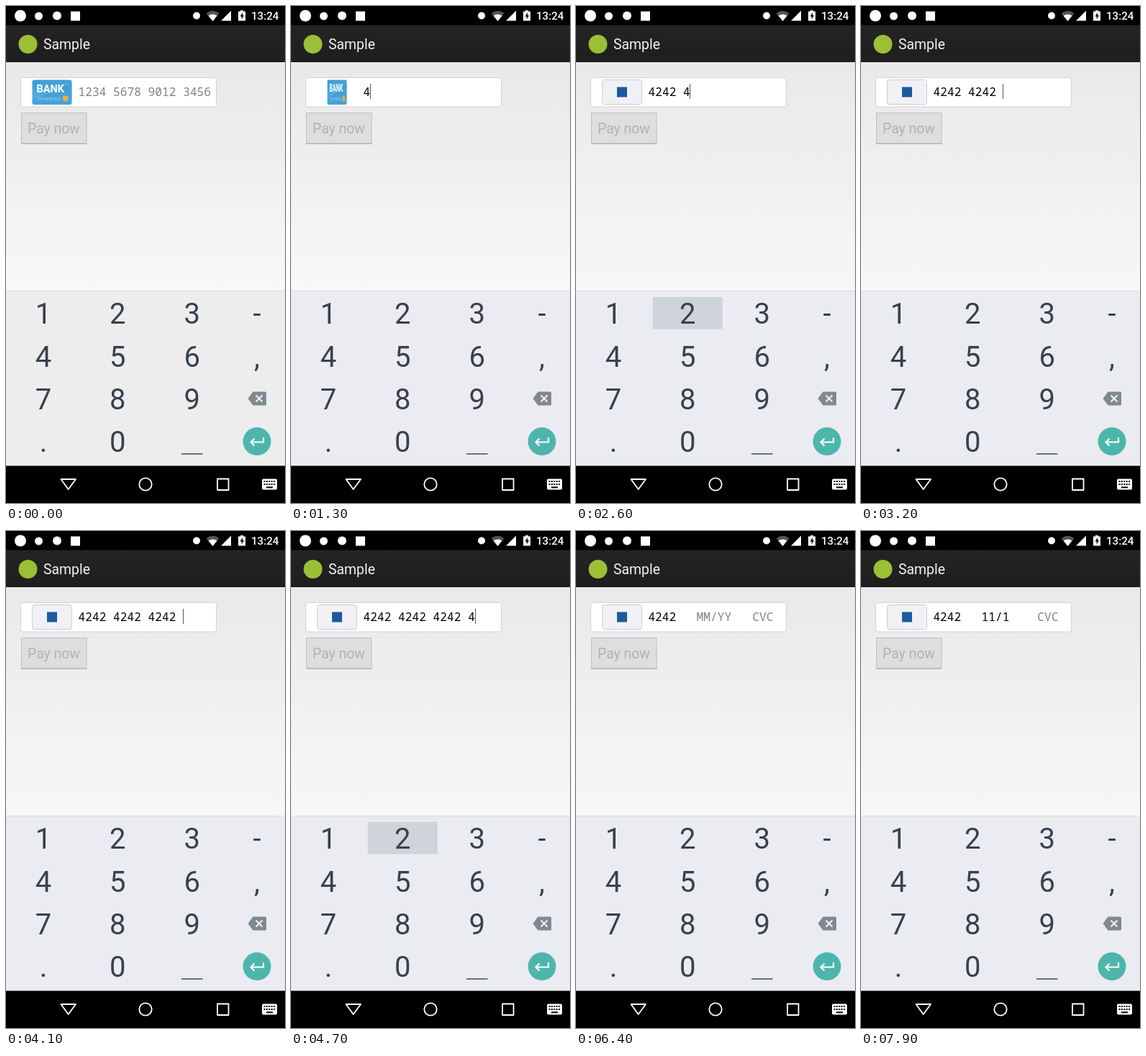
Recreate the animation shown at these times as an HTML page. Size 388 by 690 pixels, loop 8000 ms.

```html
<!DOCTYPE html>
<html lang="en">
<head>
<meta charset="utf-8">
<title>Card entry</title>
<style>
  html, body { margin: 0; width: 100%; height: 100%; overflow: hidden; background: #000; }
  svg { display: block; width: 388px; height: 690px; }
  text { font-family: Roboto, sans-serif; white-space: pre; }
  .mono text { font-family: "Noto Sans Mono", monospace; font-size: 16.2px; }
  .hint { fill: #808080; }
  #keys text { font-size: 40px; fill: #36424d; text-anchor: middle; }
</style>
</head>
<body>
<svg viewBox="0 0 388 690">
  <defs>
    <linearGradient id="page" x2="0" y2="1">
      <stop id="pageTop" stop-color="#e8e8e8"/><stop id="pageEnd" offset="1" stop-color="#f8f8f8"/>
    </linearGradient>
    <linearGradient id="bar" x2="0" y2="1">
      <stop stop-color="#242424"/><stop offset="1" stop-color="#1e1e1e"/>
    </linearGradient>
    <linearGradient id="blue" x2="0.3" y2="1">
      <stop stop-color="#3d9bd6"/><stop offset="1" stop-color="#55b4e6"/>
    </linearGradient>
    <clipPath id="entry"><rect x="97" y="101" width="194" height="38"/></clipPath>
  </defs>

  <rect width="388" height="690"/>
  <g id="status" fill="#fff">
    <circle cx="20" cy="13.5" r="8"/>
    <circle cx="45.5" cy="14" r="5.5"/>
    <circle cx="71" cy="13.5" r="6"/>
    <rect x="90" y="7.5" width="13" height="13"/>
    <circle cx="265" cy="13.5" r="5"/>
    <path d="M278.5 10.2Q287.5 3.5 296.5 10.2L287.5 21Z" fill="#555"/>
    <path d="M281.5 13.5Q287.5 9.5 293.5 13.5L287.5 21Z"/>
    <path d="M313 6.5V20.5H299Z"/>
    <path d="M326 6H330V7.5H333V20.5H323V7.5H326Z"/>
    <path d="M329 9L325.5 14.5H327.7V18.5L331 13H329Z" fill="#000"/>
    <text x="341" y="19" font-size="15.1" font-weight="500">13:24</text>
  </g>

  <rect y="26.5" width="388" height="52" fill="url(#bar)"/>
  <circle cx="30.5" cy="53" r="13" fill="#9bbf35"/>
  <text x="52" y="60" font-size="19.4" fill="#f3f3f3">Sample</text>

  <rect y="78" width="388" height="318" fill="url(#page)"/>
  <rect x="20.5" y="99.5" width="272" height="40.5" rx="3" fill="#fff" stroke="#d3d3d5"/>
  <g id="bank">
    <rect x="36.5" y="102.5" width="55" height="34.5" rx="3" fill="url(#blue)"/>
    <path d="M36.5 130Q62 122 91.5 107V134Q91.5 137 88.5 137H39.5Q36.5 137 36.5 134Z" fill="#2f86c6" opacity=".35"/>
    <text x="42.5" y="119.5" font-size="14.5" font-weight="700" fill="#fff">BANK</text>
    <text x="43" y="131" font-size="4.5" fill="#b9def3">1234 5678 9012</text>
    <rect x="79" y="124.5" width="7.5" height="7.5" rx="2" fill="#e3b04b"/>
  </g>
  <g id="brand">
    <rect x="36.5" y="102.5" width="55" height="34" rx="3" fill="#f1f1f5" stroke="#cbccd0"/>
    <rect x="57" y="112.5" width="14" height="14" fill="#1c5a9f"/>
  </g>
  <g class="mono" clip-path="url(#entry)">
    <g id="strip">
      <text id="number" y="125"/>
      <text id="date" y="125"/>
      <text id="code" y="125" class="hint">CVC</text>
    </g>
    <rect id="cursor" y="108" width="1" height="21" fill="#555"/>
  </g>
  <rect x="21.5" y="148.5" width="90.5" height="42.5" fill="#dedee0" stroke="#bebebf"/>
  <path d="M21 191H112.5" stroke="#a9a9ab"/>
  <text x="30" y="177" font-size="19.4" fill="#b2b2b3">Pay now</text>

  <rect id="board" y="396" width="388" height="242.4"/>
  <rect y="395" width="388" height="1.5" fill="#e2e1df"/>
  <rect id="press" width="97" height="44.5" fill="#cfd3da"/>
  <g id="keys"></g>
  <rect x="244" y="621" width="29.5" height="1.6" fill="#4a555f"/>
  <path d="M336.5 545L343.5 535.5H360.5Q362 535.5 362 537V553Q362 554.5 360.5 554.5H343.5Z" fill="#7f898f"/>
  <path d="M347.5 540.5L356.5 549.5M356.5 540.5L347.5 549.5" stroke="#edeff2" stroke-width="2.2"/>
  <circle cx="349" cy="604.5" r="19.5" fill="#4db6ac"/>
  <path d="M358 599V605.5H341M345.5 600.5L340.5 605.5L345.5 610.5" fill="none" stroke="#fff" stroke-width="2.2"/>

  <g fill="none" stroke="#fff" stroke-width="1.8" stroke-linejoin="round">
    <path d="M76.5 657H97L86.7 671Z"/>
    <circle cx="194" cy="664" r="8.7"/>
    <rect x="294" y="656.5" width="15.5" height="15.5"/>
  </g>
  <rect x="356" y="656.5" width="21" height="15" rx="2" fill="#fff"/>
  <path d="M358.5 660H375M358.5 664H375" stroke="#000" stroke-width="2" stroke-dasharray="2 1.4"/>
  <path d="M362 668.3H371" stroke="#000" stroke-width="2"/>
</svg>
<script>
  const LOOP = 8000, LEFT = 100.5, CHAR = 9.72, HOLD = 110;
  const FLIP = 1200, SLIDE = 5600;
  const DATE = 21.9, CODE = 29.9, SHIFT = 15; // columns along the strip
  const $ = id => document.getElementById(id);
  const clamp = v => Math.min(1, Math.max(0, v));
  const at = col => LEFT + col * CHAR;

  // Release times of the keys: sixteen card digits, then the date.
  const cardTimes = [1200, 1500, 1900, 2250, 2500, 2700, 2900, 3100,
                     3400, 3600, 3800, 4000, 4500, 4800, 5100, 5600];
  const dateTimes = [6800, 7000, 7380];
  const taps = [
    ...cardTimes.map((time, i) => ({ time, key: i % 2 ? 2 : 4 })),
    ...dateTimes.map(time => ({ time, key: 1 }))
  ];

  const columns = [52, 155.3, 258.7, 349], rows = [441, 500.5, 559.5, 619];
  ["123-", "456,", "789 ", ".0  "].forEach((line, r) =>
    [...line].forEach((label, c) => {
      if (label === " ") return;
      const key = document.createElementNS("http://www.w3.org/2000/svg", "text");
      key.setAttribute("x", columns[c]);
      key.setAttribute("y", rows[r]);
      key.textContent = label;
      $("keys").append(key);
    }));
  $("number").setAttribute("x", at(0));
  $("date").setAttribute("x", at(DATE));
  $("code").setAttribute("x", at(CODE));

  const show = (id, on) => $(id).setAttribute("visibility", on ? "visible" : "hidden");
  const write = (id, text, hint) => {
    $(id).textContent = text;
    $(id).setAttribute("class", hint ? "hint" : "");
  };
  const count = (times, t) => times.filter(time => time <= t).length;

  function tint(t) {
    const [top, end, board] = t < 900 ? ["#e8e8e8", "#f8f8f8", "#ededee"]
      : t < 2500 ? ["#e8e8e8", "#f8f8f8", "#ebebf1"]
      : ["#eae8eb", "#f8f6f9", "#eaecf1"];
    $("pageTop").setAttribute("stop-color", top);
    $("pageEnd").setAttribute("stop-color", end);
    $("board").setAttribute("fill", board);
  }

  function flip(t) {
    const turn = Math.cos(Math.PI * clamp((t - FLIP) / 300));
    show("bank", turn > 0);
    show("brand", turn <= 0);
    $(turn > 0 ? "bank" : "brand").setAttribute("transform",
      `translate(64 0) scale(${Math.abs(turn)} 1) translate(-64 0)`);
  }

  function draw(t) {
    tint(t);
    flip(t);

    const digits = count(cardTimes, t), dated = count(dateTimes, t);
    const typed = "4242 4242 4242 4242".slice(0, digits + Math.floor(digits / 4));
    write("number", digits ? typed : "1234 5678 9012 3456", !digits);
    write("date", dated ? ["1", "11/", "11/1"][dated - 1] : "MM/YY", !dated);

    const slide = 1 - (1 - clamp((t - SLIDE) / 250)) ** 3;
    $("strip").setAttribute("transform", `translate(${-SHIFT * CHAR * slide} 0)`);
    show("date", t >= SLIDE);
    show("code", t >= SLIDE);

    const last = taps.reduce((found, tap) => tap.time <= t ? tap.time : found, 100);
    const column = t < SLIDE ? typed.length * (digits > 0)
      : DATE - SHIFT * slide + [0, 1, 3, 4][dated];
    $("cursor").setAttribute("x", Math.floor(at(column)));
    show("cursor", t >= 100 && (t - last) % 1000 < 500);

    const tap = taps.find(({ time }) => t >= time - HOLD && t < time);
    show("press", tap);
    if (tap) {
      $("press").setAttribute("x", 3.2 + 103.5 * ((tap.key - 1) % 3));
      $("press").setAttribute("y", 404 + 59.3 * Math.floor((tap.key - 1) / 3));
    }
  }

  function tick() {
    draw(performance.now() % LOOP);
    requestAnimationFrame(tick);
  }
  tick();
</script>
</body>
</html>
```
